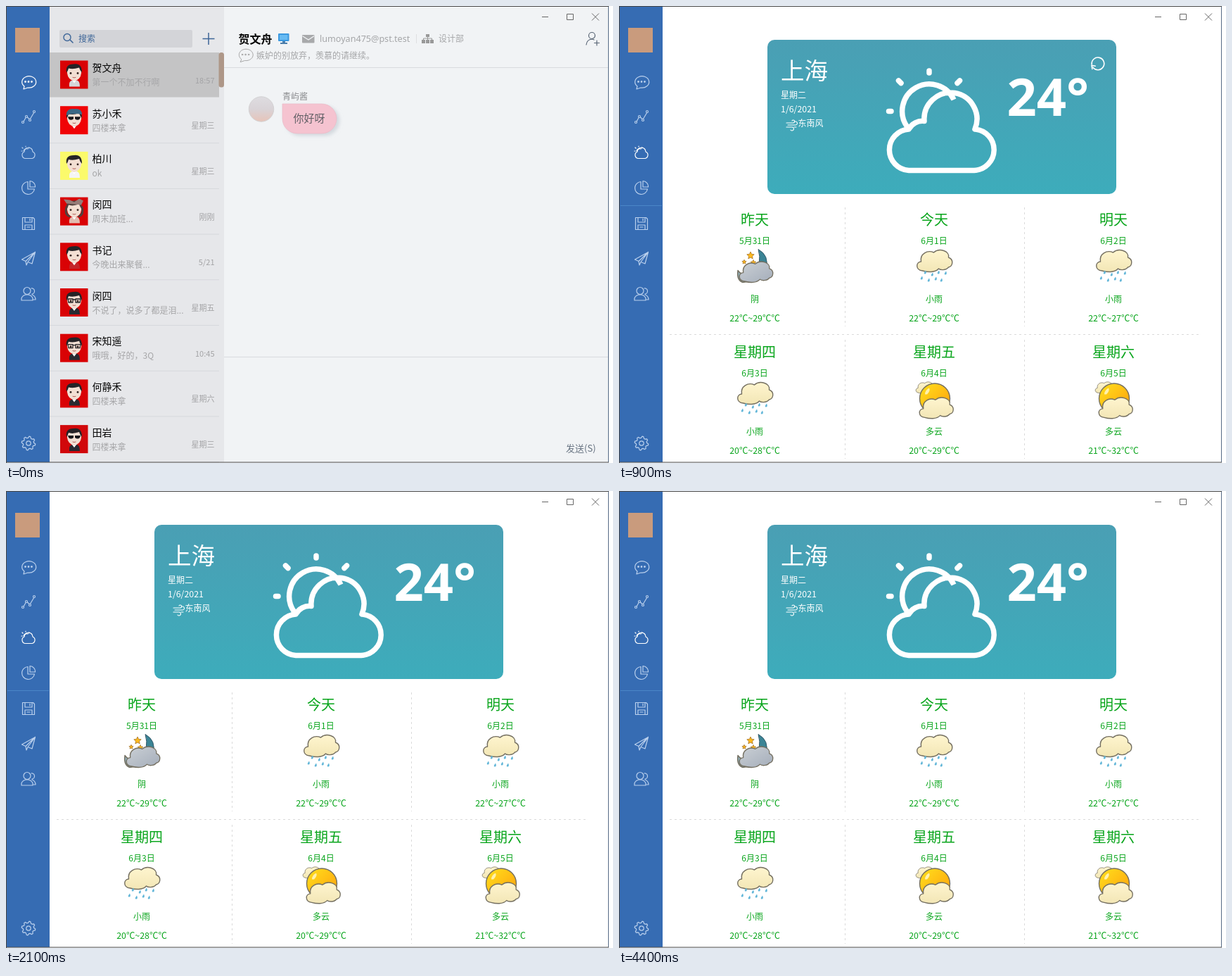
An HTML page for the animation above (4500 ms loop, 863 by 649 pixels).

```html
<!DOCTYPE html>
<html lang="zh-CN">
<head>
<meta charset="utf-8">
<style>
html, body { margin: 0; width: 100%; height: 100%; overflow: hidden; background: #fff; }
svg { display: block; width: 863px; height: 649px; font-family: "Noto Sans CJK SC", "Noto Sans CJK", "Noto Sans", sans-serif; }
.line { fill: none; stroke-linecap: round; stroke-linejoin: round; }
.latin { font-family: "Noto Sans", "Open Sans", sans-serif; }
</style>
</head>
<body>
<svg id="stage" viewBox="0 0 863 649"></svg>
<script>
const LOOP = 4500, STEP = 100;
const HOVER_AT = 700, WEATHER_AT = 900, SPIN_END = 1700;
const stage = document.getElementById('stage');

const text = (x, y, s, size, fill, extra = '') =>
  `<text x="${x}" y="${y}" font-size="${size}" fill="${fill}" ${extra}>${s}</text>`;
const rect = (x, y, w, h, fill, extra = '') =>
  `<rect x="${x}" y="${y}" width="${w}" height="${h}" fill="${fill}" ${extra}/>`;
const circle = (x, y, r, extra = '') => `<circle cx="${x}" cy="${y}" r="${r}" ${extra}/>`;
const path = (d, extra = '') => `<path d="${d}" ${extra}/>`;
const at = (x, y, body, extra = '') => `<g transform="translate(${x} ${y})" ${extra}>${body}</g>`;
const MIDDLE = 'text-anchor="middle"';

// Sidebar
function gear() {
  const points = [];
  for (let i = 0; i < 32; i++) {
    const a = (i + 0.5) * Math.PI / 16;
    const r = i % 4 < 2 ? 9.8 : 7.6;
    points.push((r * Math.cos(a)).toFixed(1) + ' ' + (r * Math.sin(a)).toFixed(1));
  }
  return path(`M${points.join('L')}Z`) + circle(0, 0, 3.2);
}

const bubbleIcon = path('M-6 6A10 8.2 0 1 1-1 8L-7 10Z') +
  [-4.5, 0, 4.5].map(x => circle(x, -0.5, 0.8, 'fill="currentColor"')).join('');

const sideIcons = [
  ['chatIcon', 108, bubbleIcon],
  ['', 158, path('M-7 6L-3-1L2 3L8-7') +
    [[-8, 7], [-3, -1], [2, 4], [8, -8]].map(([x, y]) => circle(x, y, 1.5, 'fill="#366cb3"')).join('')],
  ['weatherIcon', 208, path('M-5 8.5A5 5 0 0 1-6-1A6 6 0 0 1 6-1A5 5 0 0 1 5 8.5Z') +
    path('M-7-2A4.5 4.5 0 0 1-1-5M-4-9V-8M-9-7L-8-6M1-7L0-6M-10-2H-9')],
  ['', 258, path('M-1-8.5A9 9 0 1 0 8.5 2H-1ZM2-9.5A8 8 0 0 1 9.5-1H2Z')],
  ['', 309, path('M-8.5-8.5H6.5L8.5-6.5V8.5H-8.5ZM-5-8V-2H5V-8M2-7V-4M-5 8V2H5V8M-2 5H2')],
  ['', 359, path('M9.5-9.5L-9.5 1L-4 3.5L9.5-9.5L5 7L-1 4.5L9.5-9.5M-4 3.5L-3 9L-1 4.5')],
  ['', 409, circle(-2, -4.5, 5) + path('M-10 9V6Q-8 1-2 1Q4 1 6 6V9ZM4-8A4 4 0 0 1 5 0M5 1Q10 3 10 8H7')],
  ['', 621, gear()]
];

const sidebar = rect(1, 1, 61, 647, '#366cb3') +
  rect(13, 31, 35, 35, '#c99b7d') +
  '<path id="sideLine" d="M2 283.5H61" stroke="#4b86c8"/>' +
  sideIcons.map(([id, y, body]) =>
    at(32, y, body, `class="line" ${id && `id="${id}"`} stroke="currentColor" color="#bad0ed" stroke-width="1.2"`)).join('');

// Conversations
function avatar({ bg = '#d90205', hair = '#252326', coat = '#292a31', eyes = 'plain', hat, bow }) {
  let face = path('M10 11Q20 3 30 11V18Q29 27 20 29Q11 27 10 18Z', 'fill="#f3dfd3"') +
    path('M9 17Q7 5 19 5Q31 3 31 17Q28 14 27 10Q18 13 12 11Q11 15 9 17Z', `fill="${hair}"`);
  if (bow) face += path('M9 9L5 3L14 4L20 7L27 2L33 5L30 11Z', 'fill="#967c78"') +
    path('M9 14Q6 24 13 27M31 14Q34 24 27 27', `class="line" stroke="${hair}" stroke-width="3"`);
  if (hat) face += path('M9 12Q9 3 20 4Q31 3 31 12Q20 9 9 13Z', 'fill="#3b6885"');
  if (eyes === 'dark') face += path('M11 15H19V18Q15 21 12 18ZM21 15H29L28 18Q25 21 21 18ZM18 16H22', 'fill="#17171b"');
  else face += circle(15, 18, 1.4, 'fill="#31211f"') + circle(25, 18, 1.4, 'fill="#31211f"');
  if (eyes === 'glasses') face += path('M11 15H18V20H12ZM22 15H29L28 20H22ZM18 16H22', 'class="line" stroke="#252326" stroke-width="1.3"');
  return rect(0, 0, 39.5, 40, bg, bg === '#ffff0a' ? 'id="yellowTile"' : '') +
    path('M13 37Q12 29 17 28H24Q28 29 28 37Z', `fill="${coat}"`) +
    path('M17 28L20 32L23 28Z', 'fill="#fff"') + face +
    path('M18 24Q20 25 22 24', 'class="line" stroke="#b15d56"');
}

const contacts = [
  ['贺文舟', '第一个不加不行啊', '18:57', { coat: '#d5d5d8' }],
  ['苏小禾', '四楼来拿', '星期三', { bg: '#f00306', eyes: 'dark', hat: true, coat: '#f00306' }],
  ['柏川', 'ok', '星期三', { bg: '#ffff0a', coat: '#f5f5f5' }],
  ['闵四', '周末加班...', '刚刚', { hair: '#51403d', bow: true, coat: '#e2bcb0' }],
  ['书记', '今晚出来聚餐...', '5/21', { coat: '#c4262a' }],
  ['闵四', '不说了，说多了都是泪...', '星期五', { eyes: 'glasses' }],
  ['宋知遥', '哦哦，好的，3Q', '10:45', { eyes: 'glasses' }],
  ['何静禾', '四楼来拿', '星期六', {}],
  ['田岩', '四楼来拿', '星期三', { bg: '#d1080b', eyes: 'dark' }]
];

const contactRow = ([name, note, time, look], i) => at(0, 64.7 * i,
  at(77, 77.5, avatar(look)) +
  text(122.5, 93, name, 14, '#080808') +
  text(122.5, 113, note, 12, '#a6a6a8') +
  text(296.5, 109.5, time, 11, '#a3a3a5', 'text-anchor="end"') +
  (i ? path('M62 130H303', 'stroke="#d6d8dc"') : ''));

const conversations = rect(62, 1, 248, 647, '#e6e7ea') +
  rect(76, 34, 189, 25, '#d3d4d8', 'rx="2"') +
  `<g id="search" color="#555">` +
  path('M91.5 48.5L95 52', 'class="line" stroke="currentColor" stroke-width="1.6"') +
  circle(87, 44.5, 5, 'fill="none" stroke="currentColor" stroke-width="1.4"') +
  text(103, 50.5, '搜索', 12, 'currentColor') +
  path('M279.5 46.5H296.5M288 38V55', 'stroke="currentColor" stroke-width="1.5"') + '</g>' +
  rect(62, 66, 241, 63.5, '#c4c4c5') +
  contacts.map(contactRow).join('') +
  rect(302.5, 66, 7.5, 49.5, '#929297', 'rx="3.5" id="scroll"');

const messages = rect(310, 1, 546, 647, '#f1f3f5') +
  path('M310 87.5H856M310 498.5H856', 'stroke="#d9dbde"') +
  text(330.5, 52.5, '贺文舟', 16, '#050505', 'font-weight="700"') +
  rect(387, 39, 15.5, 11, '#3b98df', 'rx="1"') + rect(389, 41, 11.5, 7, '#67baf2') +
  path('M393 50H397V52H400V54H390V52H393Z', 'fill="#4d7eab"') +
  rect(421, 41, 17.5, 11.5, '#a8a9ab', 'rx="1"') +
  path('M422 43L430 48L437.5 43', 'class="line" stroke="#f1f3f5" stroke-width="1.4"') +
  text(446, 50.5, 'lumoyan475@pst.test', 12.6, '#a5a6a8', 'class="latin"') +
  path('M583.5 40V53', 'stroke="#dedfe1"') +
  path('M597 40H602V44H597ZM591 48H596V53H591ZM597 48H602V53H597ZM603 48H608V53H603Z', 'fill="#999"') +
  path('M599.5 44V48M593.5 48V46H605.5V48', 'class="line" stroke="#999"') +
  text(615, 50.5, '设计部', 12, '#a5a6a8') +
  at(340.5, 69.5, bubbleIcon, 'class="line" stroke="currentColor" color="#a8a8a8"') +
  text(356, 74.5, '嫉妒的别放弃，羡慕的请继续。', 12, '#a5a6a8') +
  at(834, 46, circle(-1, -4, 4.5) + path('M-9 9Q-8 1 0 1L2 2M6 3V10M2.5 6.5H9.5'), 'class="line" stroke="#596575" stroke-width="1.2"') +
  circle(363, 146.5, 17.7, 'fill="url(#portrait)" stroke="#d2d1d2"') +
  text(393, 132.5, '青屿酱', 12, '#88898c') +
  path('M393 139H449A21 21 0 0 1 449 181H414A21 21 0 0 1 393 160Z', 'fill="#f5c3d0" stroke="#eab9c6" stroke-width=".7" filter="url(#soft)"') +
  text(408.5, 165, '你好呀', 15, '#626066') +
  text(796, 632.5, '发送(S)', 13, '#687482');

// Forecast
const OUTLINE = 'stroke="#746f60" stroke-width="1.4" stroke-linejoin="round"';
const cloud = (x, y, fill, scale = 1) => at(x, y,
  path('M8 30C-2 29-2 18 6 17C4 6 15 0 24 4C32-3 47 2 45 11C53 14 51 24 45 25C41 30 33 29 31 27C26 33 15 32 8 30Z',
    `fill="${fill}" ${OUTLINE} transform="scale(${scale})"`));
const star = (x, y, r) => {
  const points = Array.from({ length: 10 }, (_, i) => {
    const a = i * Math.PI / 5 - Math.PI / 2, d = i % 2 ? r * 0.48 : r;
    return [x + d * Math.cos(a), y + d * Math.sin(a)].map(n => n.toFixed(1)).join();
  });
  return `<polygon points="${points.join(' ')}" fill="#ffb91d" stroke="#98651a" stroke-width=".7"/>`;
};
const drop = (x, y) => path(`M${x + 1} ${y}Q${x - 3} ${y + 5} ${x} ${y + 5}Q${x + 3} ${y + 5} ${x + 1} ${y}`, 'fill="#62b6d8"');

const weatherArt = {
  night: path('M30 0Q46 9 41 27Q36 40 23 34Q36 21 30 0Z', 'fill="#3b8495" stroke="#335969"') +
    star(19, 9, 5.5) + star(10, 18, 3.2) + star(23, 19, 4) +
    path('M8 47Q-1 44 1 30Q5 36 11 34L14 46Z', `fill="#8fa9b1" ${OUTLINE}`) +
    cloud(3, 17, 'url(#greyCloud)', 0.95),
  rain: cloud(0.5, 0.5, 'url(#cream)') +
    [[12, 30], [22, 33], [31, 30], [41, 31], [7, 38], [17, 41], [27, 39], [35, 41]].map(p => drop(...p)).join(''),
  sunny: cloud(-1, 0, 'url(#cream)', 0.53) + circle(26, 24, 21.5, `fill="url(#sun)" ${OUTLINE}`) +
    path('M12 18Q12 12 18 9Q20 13 15 18Z', 'fill="#fff2ac"') + cloud(4, 22, 'url(#cream)', 0.96)
};

const days = [
  ['昨天', '5月31日', 'night', '阴', '22℃~29℃℃'],
  ['今天', '6月1日', 'rain', '小雨', '22℃~29℃℃'],
  ['明天', '6月2日', 'rain', '小雨', '22℃~27℃℃'],
  ['星期四', '6月3日', 'rain', '小雨', '20℃~28℃℃'],
  ['星期五', '6月4日', 'sunny', '多云', '20℃~29℃℃'],
  ['星期六', '6月5日', 'sunny', '多云', '21℃~32℃℃']
];
const GREEN = '#08a51b';
const dayCell = ([title, date, art, sky, range], i) => at(193 + 255 * (i % 3), 188 * Math.floor(i / 3),
  text(0, 311, title, 20, GREEN, MIDDLE) + text(0, 337.5, date, 12, GREEN, MIDDLE) +
  at(-25, 345.5, weatherArt[art]) +
  text(0, 421, sky, 12, GREEN, MIDDLE) + text(0, 448, range, 12.4, GREEN, MIDDLE));

const forecast = rect(62, 1, 794, 647, '#fff') +
  rect(211, 48, 496, 219, 'url(#card)', 'rx="10"') +
  text(230, 103.5, '上海', 33.5, '#fff', 'font-weight="300"') +
  text(230, 130.5, '星期二', 12, '#fff') + text(230, 150.5, '1/6/2021', 12.4, '#fff') +
  path('M238 166H248A2 2 0 1 0 246 163M240 169H251A2.5 2.5 0 1 0 249 165M238 172H246A2.5 2.5 0 1 1 244 176M249 172H252', 'class="line" stroke="#fff" stroke-width="1.1"') +
  text(254.5, 170.5, '东南风', 12, '#fff') +
  path('M410 172A38.5 38.5 0 1 1 476 133M412 233.5A29.3 29.3 0 0 1 412 175A22 22 0 0 1 434 163.5A37.5 37.5 0 1 1 506 175A29.3 29.3 0 0 1 505 233.5Z', 'fill="none" stroke="#fff" stroke-width="7.5" stroke-linejoin="round"') +
  path('M441 92V95M397.5 106L401 109.5M484.5 106L481 109.5M383.5 149.5H387', 'class="line" stroke="#fff" stroke-width="7.5"') +
  text(551.5, 155.5, '24°', 74, '#fff', 'class="latin" font-weight="700"') +
  '<g id="refresh">' + path('M7.7 4.4A8.8 8.8 0 1 1 8.8 0', 'class="line" stroke="#fff" stroke-width="1.6" transform="rotate(0)"') +
  path('M5 -.5L8.7 3.5L11 -1.5', 'class="line" stroke="#fff" stroke-width="1.5"') + '</g>' +
  path('M72 466.5H827M321.5 286V455M576.5 286V455M321.5 474V643M576.5 474V643', 'stroke="#dadada" stroke-dasharray="3 4"') +
  days.map(dayCell).join('');

const gradient = (id, stops, x2 = 0, y2 = 1) =>
  `<linearGradient id="${id}" x1="0" y1="0" x2="${x2}" y2="${y2}">` +
  stops.map((c, i) => `<stop offset="${i / (stops.length - 1)}" stop-color="${c}"/>`).join('') + '</linearGradient>';

stage.innerHTML = '<defs>' +
  gradient('card', ['#4a9fb4', '#3dacbb']) +
  gradient('cream', ['#fff5cf', '#f2e6b5']) +
  gradient('greyCloud', ['#cbd0d5', '#a4adba'], 1) +
  gradient('sun', ['#ffe11d', '#ff9d0b'], 1) +
  gradient('portrait', ['#dedce0', '#d9d3d7', '#e7c4b9']) +
  '<filter id="soft" x="-20%" y="-20%" width="150%" height="150%"><feDropShadow dx="4" dy="3" stdDeviation="2.5" flood-color="#bcc4cc" flood-opacity=".55"/></filter></defs>' +
  rect(0, 0, 863, 649, '#fff') + sidebar +
  `<g id="chat">${conversations + messages}</g><g id="forecast">${forecast}</g>` +
  path('M762 15.5H771M797.5 11.5H806.5V19.5H797.5ZM833 10.5L843 20.5M843 10.5L833 20.5', 'fill="none" stroke="#666" id="controls"') +
  path('M856.5 1V648', 'stroke="#566b86"') +
  path('M0 .5H857M.5 0V649M0 648H857', 'stroke="#484848" fill="none"');

const part = Object.fromEntries([...stage.querySelectorAll('[id]')].map(el => [el.id, el]));
const show = (el, on) => el.setAttribute('display', on ? 'inline' : 'none');

function render(time) {
  const t = Math.floor((time % LOOP) / STEP) * STEP;
  const weather = t >= WEATHER_AT, opening = t < STEP;
  show(part.chat, !weather);
  show(part.forecast, weather);
  show(part.sideLine, t >= HOVER_AT);
  part.chatIcon.setAttribute('color', weather ? '#bad0ed' : '#fff');
  part.weatherIcon.setAttribute('color', t >= HOVER_AT ? '#fff' : '#bad0ed');
  part.search.setAttribute('color', opening ? '#3e6698' : '#555');
  part.scroll.setAttribute('fill', opening ? '#ae9788' : '#929297');
  part.yellowTile.setAttribute('fill', opening ? '#fbfa6b' : '#ffff0a');
  show(part.refresh, weather && t < SPIN_END);
  const angle = 145 + (t - WEATHER_AT) * 225 / 400;
  part.refresh.setAttribute('transform', `translate(681 82) rotate(${angle})`);
}

const start = performance.now();
function tick() {
  render(performance.now() - start);
  requestAnimationFrame(tick);
}
render(0);
requestAnimationFrame(tick);
</script>
</body>
</html>
```
